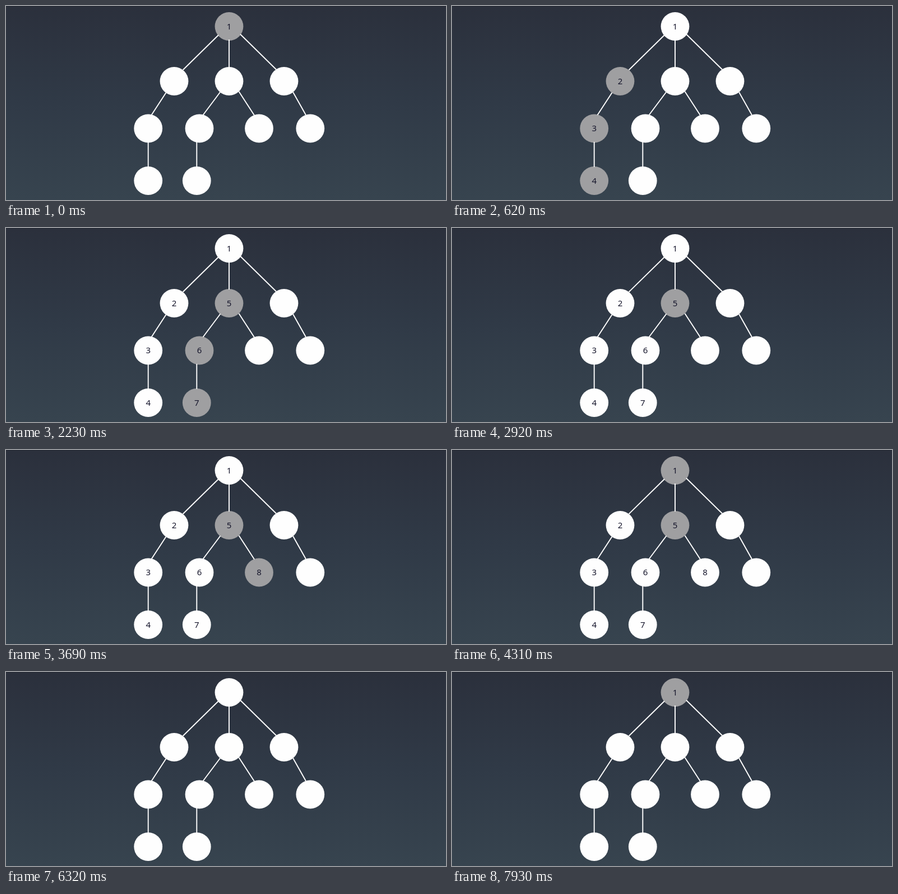
Recreate the animation shown at these times as an HTML page. Size 785 by 347 pixels, loop 8000 ms.

```html
<!DOCTYPE html>
<html lang="en">
<head>
<meta charset="utf-8">
<title>Depth-first traversal</title>
<style>
  html, body { margin: 0; width: 100%; height: 100%; overflow: hidden; }
  svg { display: block; width: 100%; height: 100%; }
  text { font: 15px "Noto Sans", "Open Sans", sans-serif; text-anchor: middle; fill: #15152b; }
</style>
</head>
<body>
<svg id="stage" viewBox="0 0 785 347">
  <defs>
    <linearGradient id="sky" x1="0" y1="0" x2="0" y2="1">
      <stop offset="0" stop-color="#2b303c"/>
      <stop offset="0.5" stop-color="#303a47"/>
      <stop offset="1" stop-color="#37444f"/>
    </linearGradient>
  </defs>
  <rect width="785" height="347" fill="url(#sky)"/>
  <rect width="785" height="1" fill="#20252f"/>
</svg>
<script>
const LOOP = 8000;
const CLEAR = 5860;
const WHITE = '#fefefe';
const GRAY = '#9f9fa1';

// Nodes in visiting order; "active" holds the [start, end) times of the highlight.
const nodes = [
  { x: 398, y: 36.5, active: [[0, 620], [1690, 2000], [4310, 5080], [7930, LOOP]] },
  { x: 300, y: 134.5, active: [[150, 1770]] },
  { x: 253.7, y: 219, active: [[620, 1620]] },
  { x: 253.7, y: 312.5, active: [[620, 1540]] },
  { x: 398, y: 134.5, active: [[2000, 4390]] },
  { x: 345, y: 219, active: [[2000, 2920]] },
  { x: 340.3, y: 312.5, active: [[2000, 2920]] },
  { x: 451.5, y: 219, active: [[3460, 4310]] },
  { x: 496, y: 134.5, active: [[4770, CLEAR]] },
  { x: 542.8, y: 219, active: [[4770, CLEAR]] }
];

const edges = [
  'M379 52L315.5 114.5', 'M398 60V110', 'M418 50.5L482 113.5',
  'M285.5 155L259.5 195', 'M382.5 153.5L351.5 195',
  'M415.5 153L443 195.5', 'M512 154L535 195',
  'M253.7 243V288', 'M340.3 243V288'
];

const stage = document.getElementById('stage');

function add(tag, attributes) {
  const element = document.createElementNS('http://www.w3.org/2000/svg', tag);
  for (const name in attributes) element.setAttribute(name, attributes[name]);
  return stage.appendChild(element);
}

nodes.forEach((node, i) => {
  node.disc = add('circle', { cx: node.x, cy: node.y, r: 25.4 });
  node.label = add('text', { x: node.x, y: node.y + 5.4 });
  node.label.textContent = i + 1;
});
add('path', { d: edges.join(''), stroke: WHITE, 'stroke-width': 1.9, fill: 'none' });

function draw(now) {
  const time = now % LOOP;
  for (const { disc, label, active } of nodes) {
    const isActive = active.some(([start, end]) => time >= start && time < end);
    const isNumbered = isActive || (time >= active[0][0] && time < CLEAR);
    disc.setAttribute('fill', isActive ? GRAY : WHITE);
    label.setAttribute('visibility', isNumbered ? 'visible' : 'hidden');
  }
}

function tick() {
  draw(performance.now());
  requestAnimationFrame(tick);
}
tick();
</script>
</body>
</html>
```
